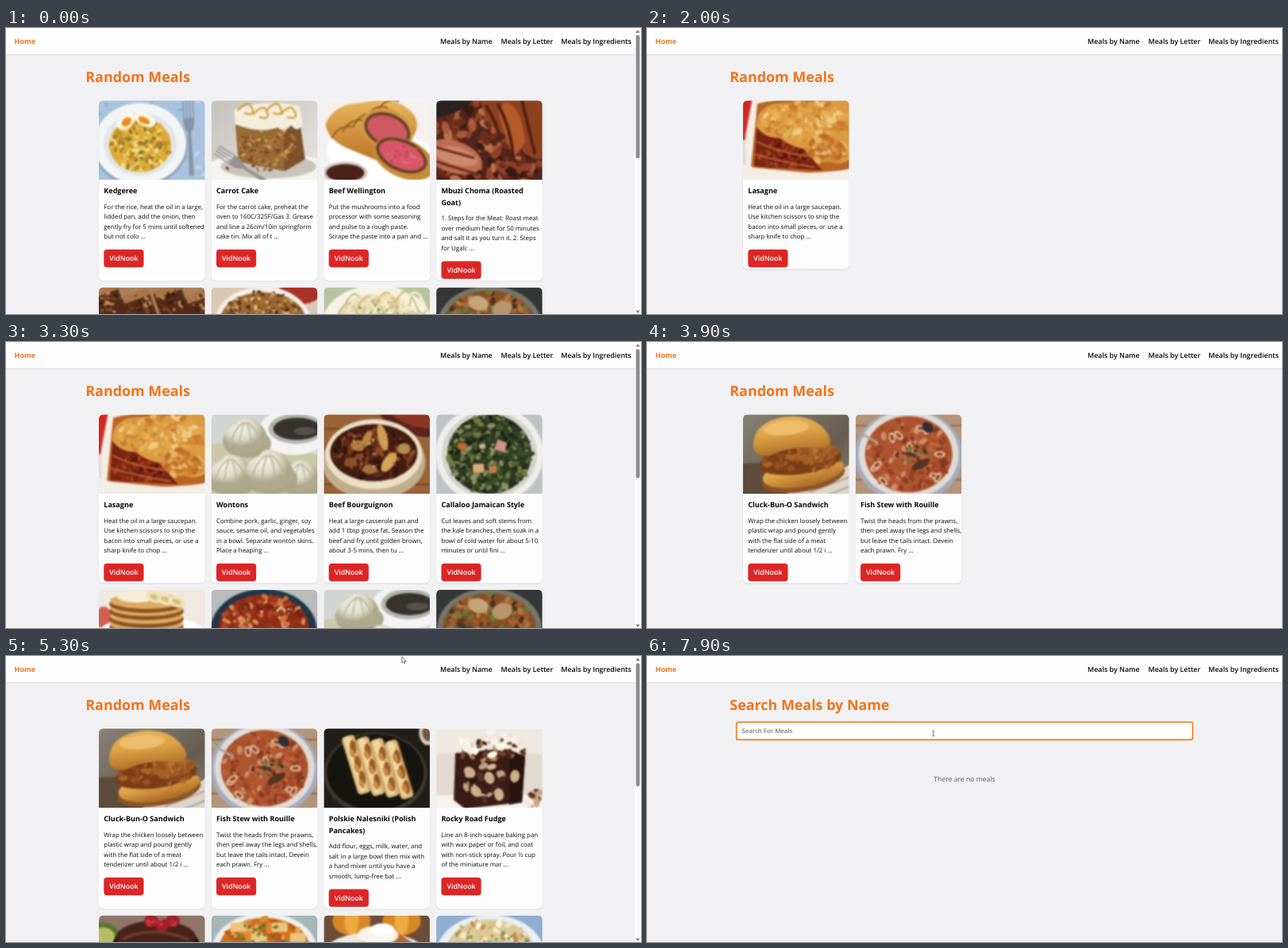
Write an HTML page that moves like this. It is 800 by 360 pixels and loops after 8 s.

```html
<!DOCTYPE html>
<html lang="en">
<head>
<meta charset="utf-8">
<title>Random Meals</title>
<style>
  html, body { margin: 0; width: 100%; height: 100%; overflow: hidden; background: #f1f1f4; }
  svg { display: block; width: 100vw; height: 100vh; }
  text { font-family: "Open Sans", "Noto Sans", sans-serif; text-rendering: geometricPrecision; white-space: pre; }
  .h1 { font-size: 17.9px; font-weight: 700; fill: #f27318; }
  .home { font-size: 9px; font-weight: 700; fill: #f27318; }
  .link { font-size: 8.9px; font-weight: 600; fill: #060606; }
  .title { font-size: 9.05px; font-weight: 700; fill: #060606; }
  .body { font-size: 7.9px; fill: #0c0c0c; }
  .button { font-size: 8.8px; font-weight: 600; fill: #fff; }
  .hint { font-size: 7.8px; font-weight: 600; fill: #77777b; }
  .empty { font-size: 8.67px; fill: #5c5f66; }
  .status { font-size: 6px; fill: #56687e; }
  .soft { filter: blur(.8px); }
</style>
</head>
<body>
<svg viewBox="0 0 800 360" xmlns="http://www.w3.org/2000/svg">
  <defs>
    <clipPath id="photo"><path d="M0 99.8V6Q0 0 6 0H127.5Q133.5 0 133.5 6V99.8Z"/></clipPath>
    <linearGradient id="crust" x2="0" y2="1"><stop stop-color="#e9b65c"/><stop offset="1" stop-color="#b97426"/></linearGradient>
    <linearGradient id="bun" x2=".25" y2="1"><stop stop-color="#e8b35a"/><stop offset=".5" stop-color="#dda247"/><stop offset="1" stop-color="#b0702a"/></linearGradient>
    <linearGradient id="linen" x2="1" y2="1"><stop stop-color="#c4c1bb"/><stop offset="1" stop-color="#e9e6e1"/></linearGradient>
    <linearGradient id="table" x2="1" y2="1"><stop stop-color="#8b8376"/><stop offset=".6" stop-color="#665d50"/><stop offset="1" stop-color="#8d8274"/></linearGradient>
    <radialGradient id="dough" cx=".4" cy=".3"><stop stop-color="#f4f1e6"/><stop offset=".6" stop-color="#dfdbc8"/><stop offset="1" stop-color="#aea88d"/></radialGradient>
  </defs>
  <g id="page"></g><g id="nav"></g><g id="overlay"></g>
</svg>
<script>
const LOOP = 8000, RELOADS = [1700, 3500], OPEN_SEARCH = 6800, FOCUS = 7700, CARD_TOP = 91.3;
const layer = id => document.getElementById(id);

const text = (x, y, cls, s, extra = "") => `<text x="${x}" y="${y}" class="${cls}" ${extra}>${s}</text>`;
const rect = (x, y, w, h, fill, r = 0, extra = "") =>
  `<rect x="${x}" y="${y}" width="${w}" height="${h}" rx="${r}" fill="${fill}" ${extra}/>`;
const oval = (x, y, rx, ry, fill, turn = 0) =>
  `<ellipse cx="${x}" cy="${y}" rx="${rx}" ry="${ry}" fill="${fill}" transform="rotate(${turn} ${x} ${y})"/>`;
const shape = (d, fill) => `<path d="${d}" fill="${fill}"/>`;
const line = (d, color, w) => `<path d="${d}" fill="none" stroke="${color}" stroke-width="${w}" stroke-linecap="round"/>`;
const ground = fill => rect(-4, -4, 142, 110, fill);

// Seeded bits of food inside an ellipse.
function bits(seed, n, x, y, rx, ry, size, colors) {
  const rnd = () => (seed = (seed * 16807 + 11) % 2147483647) / 2147483647;
  for (let i = 0; i < 9; i++) rnd();
  let out = "";
  for (let i = 0; i < n; i++) {
    const a = rnd() * 6.283, d = Math.sqrt(rnd()), s = size * (.5 + rnd() * .7);
    out += oval((x + Math.cos(a) * d * rx).toFixed(1), (y + Math.sin(a) * d * ry).toFixed(1),
      s.toFixed(1), (s * .6).toFixed(1), colors[Math.floor(rnd() * colors.length)], Math.round(rnd() * 180));
  }
  return out;
}
const fork = (x, y, turn, color) => `<g transform="translate(${x} ${y}) rotate(${turn})">` +
  [-6, -2, 2, 6].map(p => line(`M${p} 0V24`, color, 1.6)).join("") +
  shape("M-7 22H7Q7 36 2 40L3 95H-3L-2 40Q-7 36-7 22Z", color) + "</g>";
const dumpling = (x, y, s) => `<g transform="translate(${x} ${y}) scale(${s})">` + oval(2, 8, 25, 15, "#aaa68a") +
  shape("M-24 6Q-22-8-9-13Q-4-22 5-18Q20-15 24 5Q22 17 0 18Q-21 17-24 6Z", "url(#dough)") +
  [-15, -6, 6, 15].map(p => line(`M${p} 9Q${p * .9}-6 ${p * .15}-14`, "#b9b39a", 1.3)).join("") + "</g>";

const dishes = {
  kedgeree: () => ground("#a9c3df") + bits(4, 45, 66, 50, 95, 70, 4, ["#bfd4e9", "#92b0d2"]) +
    oval(52, 56, 60, 53, "#8da7c5") + oval(52, 54, 58, 51, "#f3f5f5") + oval(52, 55, 46, 40, "#e2e6e7") +
    oval(52, 56, 39, 34, "#d9aa38") + bits(7, 150, 52, 56, 37, 32, 4, ["#edc757", "#f3dc88", "#c28c25", "#e2b23e", "#a98128"]) +
    oval(34, 26, 13, 9, "#faf7ea", -38) + oval(35, 27, 7, 5, "#ed8c21", -38) +
    oval(58, 24, 14, 8, "#faf7ea", 25) + oval(57, 25, 8, 4, "#ed8c21", 25) +
    bits(12, 14, 48, 58, 30, 25, 3, ["#6f7d30", "#a0662c"]) + fork(112, 0, -3, "#8594a4"),
  carrotCake: () => ground("url(#linen)") + oval(72, 89, 85, 23, "#f4f3ee") + oval(72, 83, 60, 15, "#c9c3b9") +
    shape("M30 27L111 24L118 74L92 89L34 77Z", "#976a36") +
    shape("M91 33L111 25L118 74L92 89Z", "#7c522b") +
    bits(5, 130, 71, 57, 36, 25, 3, ["#b48245", "#6c4722", "#c69a5d", "#845625", "#bc7131"]) +
    shape("M29 12Q65-3 111 7L115 30Q108 42 101 31Q91 42 84 34Q60 42 30 30Z", "#f4eddc") +
    [34, 53, 70, 88].map((x, i) => line(`M${x} ${12 + i % 2 * 5}q12-14 17-3t-9 7`, "#d39b36", 2.2)).join("") +
    bits(8, 10, 58, 84, 43, 5, 3, ["#87562c", "#ae7840"]) + fork(7, 62, -57, "#929392"),
  wellington: () => ground("#f4f0ec") + oval(77, 74, 75, 39, "#fff", 13) +
    shape("M2 30Q12 4 47 3Q88-8 110 14Q127 32 106 53L73 78L27 59Q5 48 2 30Z", "url(#crust)") +
    [0, 1, 2, 3, 4].map(i => line(`M${10 + i * 14} ${47 - i * 8}Q${19 + i * 15} ${30 - i * 9} ${38 + i * 14} ${33 - i * 8}`, "#8d541d", 1.7)).join("") +
    oval(80, 36, 34, 25, "#d29643", 22) + oval(80, 37, 30, 21, "#69452d", 22) + oval(80, 37, 26, 17, "#cf5962", 22) +
    oval(101, 73, 41, 24, "#ca8b35", 24) + oval(98, 69, 34, 20, "#65432d", 24) + oval(98, 69, 30, 16, "#d75668", 24) +
    bits(9, 35, 98, 69, 25, 12, 2, ["#df7580", "#c64558"]) + oval(27, 91, 28, 14, "#d0cac0") + oval(27, 91, 24, 11, "#4b2118"),
  roast: () => ground("#51251a") + bits(3, 180, 67, 52, 78, 62, 8, ["#8f4129", "#6b2d1c", "#a9583a", "#3b1a13", "#8f4129", "#b9704c"]) +
    shape("M54-4H138V72Q111 80 97 42Q82 48 64 25Z", "#8d421f") + shape("M87 2Q107 5 112 52L98 72Q84 42 78 12Z", "#b45a2b") +
    line("M78 5Q94 35 97 70M108 0Q116 33 124 66M63 7Q76 28 81 49", "#512113", 4) +
    oval(22, 71, 37, 20, "#bc6c52", 18) + oval(25, 70, 28, 11, "#cb8a6c", 14) + line("M0 59L47 72M0 77L52 93", "#6c2b1f", 3) +
    shape("M-4-4H48Q35 17-4 22Z", "#292221"),
  lasagne: () => ground("#e4ded2") + shape("M-4-4H19L2 50H-4Z", "#d42822") + shape("M12-4H138V82L115 100H5L3 44Z", "#f4eee4") +
    shape("M18 4Q57-7 138 2V84L112 94L10 84Z", "#b96425") + shape("M17 34L66 50L100 88L14 83Z", "#7b2414") +
    bits(8, 90, 50, 68, 34, 16, 4, ["#8f2d18", "#58190e", "#a8451f", "#7b2414"]) +
    shape("M17 33Q16 10 40 4L138-2V72Q124 83 108 77Q92 80 80 61Q62 60 46 47Q28 48 17 33Z", "#db9b42") +
    bits(15, 110, 78, 26, 54, 25, 6, ["#e6b25c", "#d08735", "#e3a648", "#efc982", "#c87a2c", "#dc9c43"]) +
    bits(6, 60, 106, 61, 27, 17, 5, ["#d78c3b", "#e6b568", "#be6c27", "#c87a2c"]) +
    line("M18 52Q44 65 80 70M16 68Q52 78 90 84", "#b8642f", 2) + shape("M-4 78Q45 99 138 86V108H-4Z", "#f3ede4"),
  wontons: () => ground("#d3d5d3") + shape("M-4 38Q60 30 138 52V108H-4Z", "#cbc7a8") + oval(104, 22, 45, 29, "#f3f3f1") +
    oval(107, 18, 35, 19, "#b5b4ae") + oval(108, 18, 30, 14, "#37322d") + oval(118, 21, 14, 5, "#57504a") +
    dumpling(43, 27, 1.2) + dumpling(112, 78, 1.1) + dumpling(24, 74, 1.25) + dumpling(72, 70, 1.35),
  bourguignon: () => ground("#9a6237") + line("M0 18H134M0 88H134", "#774a22", 2) + oval(111, 5, 43, 20, "#5b241b", 18) +
    oval(114, 1, 35, 13, "#8d3625", 18) + oval(63, 60, 65, 47, "#bfae8c") + oval(63, 50, 61, 44, "#eadfc6") +
    oval(63, 48, 55, 36, "#421d12") + bits(17, 130, 63, 49, 50, 31, 5, ["#5f2a18", "#30140e", "#7b3a20", "#4a1d12", "#8c4a28"]) +
    oval(74, 29, 6, 17, "#cf9c54", -14) + oval(54, 31, 5, 12, "#bd8441", 25) + oval(82, 60, 7, 14, "#d7a458", 35) +
    oval(43, 39, 9, 7, "#b47d42") + oval(101, 43, 8, 7, "#b88b50") + oval(34, 60, 8, 6, "#8f4f2b") + oval(58, 69, 9, 6, "#a6713d") +
    bits(4, 16, 62, 49, 42, 25, 2, ["#597331", "#dcb678"]),
  callaloo: () => ground("#bfc1c2") + oval(67, 50, 68, 62, "#eeeeeb") + oval(67, 50, 60, 55, "#d3d4cd") +
    oval(67, 50, 53, 50, "#2d3722") +
    bits(21, 330, 67, 50, 52, 48, 4.5, ["#4f5e30", "#252f1c", "#6d7a40", "#3b4d27", "#1a2215", "#8c9261", "#35432a"]) +
    rect(75, 33, 13, 13, "#d59385", 2, 'transform="rotate(20 81 39)"') + rect(46, 62, 14, 11, "#d8ac78", 2) +
    rect(27, 36, 11, 8, "#c5672f", 2) + rect(66, 65, 10, 9, "#c77a49", 2) + rect(54, 37, 8, 6, "#cbb48a", 2),
  sandwich: () => ground("url(#table)") + shape("M-4 62Q40 58 138 70V108H-4Z", "#5d4c3b") +
    shape("M62 96Q100 88 138 60V108H44Z", "#dcd5ca") + line("M84 98L136 78M108 101L138 89", "#9b7a6c", 1.2) +
    oval(76, 79, 53, 18, "#8a5526", -10) + oval(76, 73, 52, 18, "url(#bun)", -10) +
    oval(72, 58, 52, 17, "#7b3d17", -8) + bits(5, 80, 73, 57, 49, 13, 5, ["#96511f", "#7b3d17", "#aa6529", "#8a471c"]) +
    oval(94, 49, 27, 11, "#a66128", -8) + bits(11, 25, 96, 48, 24, 8, 4, ["#b97535", "#96511f"]) +
    shape("M13 41Q12 9 53 3Q96-1 110 31Q112 45 92 42Q54 40 34 52Q15 54 13 41Z", "url(#bun)") +
    oval(54, 17, 29, 9, "#edbd6c", -5),
  fishStew: () => ground("#b2957a") + line("M0 14H134M0 82H134", "#8d6c50", 2) + oval(67, 52, 68, 59, "#a4acbd") +
    oval(67, 50, 63, 55, "#e0dbd6") + oval(67, 50, 55, 48, "#ad5431") +
    bits(19, 150, 67, 50, 52, 45, 5, ["#bd6640", "#984123", "#cf8e65", "#b55a34", "#833a22", "#a94c29"]) +
    Array.from({ length: 11 }, (_, i) => oval(65 + 41 * Math.cos(i * 2.4), 50 + 34 * Math.sin(i * 1.7), 7, 4, "#e3ba94", i * 37) +
      oval(65 + 41 * Math.cos(i * 2.4), 50 + 34 * Math.sin(i * 1.7), 4, 2, "#8c432a", i * 37)).join("") +
    oval(91, 16, 8, 6, "#302e35", 40) + oval(82, 63, 13, 5, "#553323", -30) + line("M-3 18L27 35", "#aaa39e", 3) +
    bits(2, 26, 72, 50, 21, 15, 3, ["#687638", "#3f3b22", "#5b2f1f"]),
  nalesniki: () => ground("#221d17") + oval(65, 57, 65, 52, "#3e382b") + oval(65, 55, 61, 48, "#15140e") +
    [0, 1, 2, 3].map(i => `<g transform="translate(${31 + i * 18} ${15 + i * 2}) rotate(-17)">` +
      rect(-8, -6, 17, 76, "#d9b778", 5) + rect(-5, -5, 9, 72, "#f0d7a2", 4) +
      [10, 30, 50].map(y => oval(3, y + i * 2, 4, 9, "#9c5a22", 8) + oval(0, y + 7, 3, 6, "#c68a45", -6)).join("") +
      line("M9 0V66", "#7a4a20", 1.5) + "</g>").join("") +
    oval(131, 5, 11, 16, "#cfc9bd") + oval(132, 5, 8, 11, "#73563b"),
  rockyRoad: () => ground("#e2dad1") + rect(-4, -4, 142, 36, "#efe8e0") + rect(-4, 84, 142, 24, "#f6f2ec") +
    shape("M24 31L88 25L112 35L108 93L36 101L22 90Z", "#391d16") + shape("M92 28L112 35L108 93L92 96Z", "#27130f") +
    bits(27, 30, 58, 70, 30, 25, 6, ["#bfa181", "#5b3021", "#d3ba96", "#4a2418", "#2e1610"]) +
    [[42, 55], [67, 62], [50, 79], [79, 83], [99, 60]].map(([x, y]) => oval(x, y, 8, 6, "#ccb08c", x)).join("") +
    bits(12, 45, 68, 27, 43, 13, 4, ["#5a2f20", "#7a4a2e", "#b98a58", "#432015"]) +
    bits(10, 26, 68, 21, 40, 17, 6, ["#f7f1e8", "#efe3d3", "#fffaf1"]) +
    bits(14, 14, 123, 88, 13, 12, 6, ["#583024", "#c9a77e", "#f0e4d5"]),
  dateBars: () => ground("#a9825c") + [0, 1, 2, 3].map(i => `<g transform="translate(${-12 + i * 40} ${8 + i % 2 * 7}) rotate(-20)">` +
    rect(0, 0, 36, 43, "#542a18", 2) + rect(2, -3, 34, 10, "#aa7647", 2) +
    bits(i + 2, 25, 18, 18, 16, 16, 3, ["#784626", "#c08c5c", "#381b12"]) + "</g>").join(""),
  rice: () => ground("#d9c9b4") + oval(113, 3, 27, 18, "#a83223") + oval(65, 46, 61, 47, "#f3f0e9") + oval(65, 42, 54, 36, "#9c6832") +
    bits(15, 160, 65, 34, 48, 29, 3, ["#c8964d", "#734520", "#e0bd78", "#543219", "#aa7437"]),
  pasta: () => ground("#b7c39f") + oval(67, 48, 70, 51, "#f5f2e7") + oval(67, 46, 54, 38, "#e7dbae") +
    Array.from({ length: 22 }, (_, i) => line(`M${18 + i * 4} ${35 + 15 * Math.sin(i * 2)}q13-30 25 0t19-8`, i % 2 ? "#f4edcf" : "#cfbe83", 2.3)).join("") +
    bits(5, 16, 67, 27, 41, 19, 2, ["#6d8a3c"]),
  soup: () => ground("#343735") + oval(67, 49, 66, 51, "#77766c") + oval(67, 49, 59, 45, "#855027") +
    bits(11, 120, 67, 42, 54, 38, 5, ["#5f3d23", "#a66c35", "#b07a40", "#48321f", "#a8592c", "#697a39"]) +
    oval(53, 20, 13, 9, "#c6a47a", 12) + oval(83, 27, 13, 10, "#b8966c", -20),
  pancakes: () => ground("#efe9df") + oval(6, 35, 10, 14, "#d2604e") + oval(67, 56, 68, 24, "#fff") +
    [43, 33, 23, 14].map(y => oval(60, y + 4, 47, 11, "#8f501f") + oval(60, y, 46, 10, "#dbab62")).join("") +
    oval(48, 9, 25, 7, "#f7eed5") + [70, 84, 98].map((x, i) => oval(x, 9 + i * 3, 11, 7, "#efe2b4", 20) + oval(x, 9 + i * 3, 6, 3, "#d5bd76", 20)).join(""),
  beans: () => ground("#b9bcbb") + oval(66, 51, 67, 52, "#22364a") + oval(66, 48, 57, 42, "#8f2c17") +
    bits(18, 140, 66, 42, 52, 36, 5, ["#b34a24", "#79210f", "#cf7440", "#9a361b", "#d6905a"]) + bits(3, 16, 66, 26, 40, 16, 2, ["#5b6b30", "#f0d8b8"]),
  chocolate: () => ground("#8e7568") + oval(4, 27, 22, 18, "#55752d") + oval(5, 27, 15, 12, "#b5bd64") +
    oval(72, 42, 56, 36, "#24110d") + oval(72, 27, 50, 20, "#482318") + line("M32 29Q66 12 112 30", "#693a2b", 4) +
    [66, 80, 93].map((x, i) => oval(x, 7 + i % 2 * 5, 9, 8, "#a31f2a") + bits(i + 3, 8, x, 8, 6, 5, 2, ["#cf4049"])).join(""),
  paneer: () => ground("#a7b6b8") + oval(67, 44, 66, 47, "#edf0eb") + oval(67, 41, 57, 38, "#cf701c") +
    bits(22, 80, 67, 34, 51, 30, 6, ["#dd8a30", "#b95a18", "#e8a650"]) +
    [24, 50, 76, 99].map((x, i) => rect(x, 9 + i % 2 * 13, 20, 12, "#ecc47c", 3)).join("") + bits(4, 18, 66, 24, 40, 17, 3, ["#557431"]),
  pumpkinPie: () => ground("#6d4d37") + [35, 98].map(x => oval(x, 7, 24, 18, "#d88726") + oval(x, 7, 9, 18, "#eda942") + line(`M${x}-9V-3`, "#596039", 4)).join("") +
    oval(64, 47, 63, 26, "#efe8df") + shape("M12 43L93 22L118 38L102 54Z", "#bc6728") + oval(68, 25, 26, 12, "#fbf3e7") + oval(74, 18, 15, 8, "#fff"),
  noodles: () => ground("#8faed0") + oval(68, 49, 68, 50, "#e9eff5") + oval(68, 44, 55, 39, "#d9ca9a") +
    bits(25, 160, 68, 39, 52, 34, 4, ["#efe7c9", "#c5a962", "#faf3df", "#84994d", "#ce8848", "#d8c58d"])
};
const photo = name => `<g clip-path="url(#photo)"><g class="soft">${dishes[name]()}</g></g>`;
const meal = (dish, title, copy) => ({ dish, title: title.split("|"), copy: copy.split("|") });

const menus = [
  { pitch: 233, below: ["dateBars", "rice", "pasta", "soup"], top: [
    meal("kedgeree", "Kedgeree", "For the rice, heat the oil in a large,|lidded pan, add the onion, then|gently fry for 5 mins until softened|but not colo ..."),
    meal("carrotCake", "Carrot Cake", "For the carrot cake, preheat the|oven to 160C/325F/Gas 3. Grease|and line a 26cm/10in springform|cake tin. Mix all of t ..."),
    meal("wellington", "Beef Wellington", "Put the mushrooms into a food|processor with some seasoning|and pulse to a rough paste.|Scrape the paste into a pan and ..."),
    meal("roast", "Mbuzi Choma (Roasted|Goat)", "1. Steps for the Meat: Roast meat|over medium heat for 50 minutes|and salt it as you turn it. 2. Steps|for Ugali: ...")] },
  { pitch: 221, below: ["pancakes", "beans", "wontons", "soup"], top: [
    meal("lasagne", "Lasagne", "Heat the oil in a large saucepan.|Use kitchen scissors to snip the|bacon into small pieces, or use a|sharp knife to chop ..."),
    meal("wontons", "Wontons", "Combine pork, garlic, ginger, soy|sauce, sesame oil, and vegetables|in a bowl. Separate wonton skins.|Place a heaping ..."),
    meal("bourguignon", "Beef Bourguignon", "Heat a large casserole pan and|add 1 tbsp goose fat. Season the|beef and fry until golden brown,|about 3-5 mins, then tu ..."),
    meal("callaloo", "Callaloo Jamaican Style", "Cut leaves and soft stems from|the kale branches, them soak in a|bowl of cold water for about 5-10|minutes or until fini ...")] },
  { pitch: 233, below: ["chocolate", "paneer", "pumpkinPie", "noodles"], top: [
    meal("sandwich", "Cluck-Bun-O Sandwich", "Wrap the chicken loosely between|plastic wrap and pound gently|with the flat side of a meat|tenderizer until about 1/2 i ..."),
    meal("fishStew", "Fish Stew with Rouille", "Twist the heads from the prawns,|then peel away the legs and shells,|but leave the tails intact. Devein|each prawn. Fry ..."),
    meal("nalesniki", "Polskie Nalesniki (Polish|Pancakes)", "Add flour, eggs, milk, water, and|salt in a large bowl then mix with|a hand mixer until you have a|smooth, lump-free bat ..."),
    meal("rockyRoad", "Rocky Road Fudge", "Line an 8-inch-square baking pan|with wax paper or foil, and coat|with non-stick spray. Pour ½ cup|of the miniature mar ...")] }
];

const card = (col, y, h, inner) => `<g transform="translate(${117 + col * 141.7} ${y})">` +
  rect(-.3, .7, 134.1, h + .4, "#dedee2", 6) + rect(0, 0, 133.5, h, "#fdfdfd", 6) + inner + "</g>";

function mealCard(m, col, h) {
  const drop = (m.title.length - 1) * 14.6;
  return card(col, CARD_TOP, h, photo(m.dish) +
    m.title.map((s, i) => text(6.3, 116.9 + i * 14.6, "title", s)).join("") +
    m.copy.map((s, i) => text(6.3, 136.6 + drop + i * 12.5, "body", s)).join("") +
    rect(6.3, 187.5 + drop, 50.2, 22.4, "#dc2626", 4) + text(31.4, 202 + drop, "button", "VidNook", 'text-anchor="middle"'));
}

function homePage(menu, count) {
  const shown = menu.top.slice(0, count);
  const h = shown.some(m => m.title.length > 1) ? 226.9 : 212.3;
  return `<g transform="translate(${count > 4 ? 0 : 4} 0)">` + text(100.3, 67.7, "h1", "Random Meals") +
    shown.map((m, i) => mealCard(m, i, h)).join("") +
    menu.below.slice(0, Math.max(0, count - 4)).map((d, i) => card(i, CARD_TOP + h + 8.3, 212, photo(d))).join("") + "</g>";
}

const searchPage = focused => text(104.3, 67.7, "h1", "Search Meals by Name") +
  rect(112.7, 83.2, 574.8, 22.2, "#fff", 2.5, focused ? 'stroke="#ee7a1c" stroke-width="1.6"' : 'stroke="#e2e3e7" stroke-width=".6"') +
  text(119.5, 97.4, "hint", "Search For Meals") + text(400, 158, "empty", "There are no meals", 'text-anchor="middle"');

const links = [
  { x: 547, w: 66, name: "Meals by Name", path: "by-name" },
  { x: 623.5, w: 65, name: "Meals by Letter", path: "by-letter" },
  { x: 699.3, w: 89, name: "Meals by Ingredients", path: "by-ingredients" }
];
const navBar = (shift, hovered) => rect(0, 33, 800, 1.2, "#e0e0e4") + rect(0, 0, 800, 33, "#fefefe") + text(10.5, 20, "home", "Home") +
  links.map(l => (l === hovered ? rect(l.x + shift - 4.5, 0, l.w + 9, 33, "#f5731a") : "") +
    text(l.x + shift, 20, "link", l.name, l === hovered ? 'style="fill:#fff"' : "")).join("");

const scrollBar = length => rect(792, 0, 8, 360, "#fafafa") + rect(793.6, 9, 4.8, length, "#8b8b8b", 2.4) +
  shape("M793.3 6L796 2.2L798.7 6Z", "#858585") + shape("M793.3 355.5L796 359.3L798.7 355.5Z", "#858585");

const pointers = {
  arrow: '<path d="M0 0V7.6L1.8 6L3 8.6L4.2 8L3 5.5H5.4Z" fill="#fff" stroke="#222" stroke-width=".6"/>',
  hand: '<path d="M-.8 .6Q0-.4 .8 .6V3.4L3.7 4.2Q4.5 4.5 4.3 6L3.5 9.6H-.9L-3 6.2Q-3 5-1.8 5.6L-.8 6.4Z" fill="#fff" stroke="#222" stroke-width=".6"/>',
  beam: '<path d="M-1.5-3.2Q0-3.2 0-2.4V2.4Q0 3.2-1.5 3.2M1.5-3.2Q0-3.2 0-2.4M0 2.4Q0 3.2 1.5 3.2" fill="none" stroke="#444" stroke-width=".7"/>'
};
const route = [[5200, 497, 0], [5300, 498.8, 1], [5600, 560, 13], [5900, 638, 25], [6300, 642, 28.5],
  [6600, 592, 18], [7100, 588, 20], [7500, 405, 78], [7700, 360.7, 97.5], [8000, 360.7, 97.5]];
function pointerAt(t) {
  const i = route.findIndex(p => p[0] > t);
  if (i < 1) return null;
  const [a, b] = [route[i - 1], route[i]], u = (t - a[0]) / (b[0] - a[0]), k = u * u * (3 - 2 * u);
  return { x: a[1] + (b[1] - a[1]) * k, y: a[2] + (b[2] - a[2]) * k };
}

const drawn = {};
function paint(id, key, make) {
  if (drawn[id] === key) return;
  drawn[id] = key;
  layer(id).innerHTML = make();
}

function update(time) {
  const t = Math.floor(time / 100) * 100, searching = t >= OPEN_SEARCH;
  const index = RELOADS.filter(r => t >= r).length, menu = menus[index];
  const count = index ? Math.max(0, Math.min(12, Math.floor((t - RELOADS[index - 1] - 280) / 115) + 1)) : 12;
  const scrolls = !searching && count > 4, shift = scrolls ? 0 : 8;
  const p = pointerAt(t);
  const hovered = p && p.y < 33 && links.find(l => p.x > l.x + shift - 4.5 && p.x < l.x + shift + l.w + 4.5);

  if (searching) paint("page", "search" + (t >= FOCUS), () => searchPage(t >= FOCUS));
  else paint("page", index + ":" + count, () => homePage(menu, count));
  paint("nav", shift + (hovered ? hovered.path : ""), () => navBar(shift, hovered));

  let top = "";
  if (scrolls) top += scrollBar(342 * 360 / (95 + Math.ceil(count / 4) * menu.pitch));
  if (hovered) top += rect(-1, 350, 73, 11, "#dde8f6", 1, 'stroke="#c3cfdf" stroke-width=".5"') +
    text(2, 357.6, "status", "localhost:5173/" + hovered.path);
  if (p) {
    const inField = searching && p.y > 83 && p.y < 106;
    top += `<g transform="translate(${p.x} ${p.y})">${pointers[hovered ? "hand" : inField ? "beam" : "arrow"]}</g>`;
  }
  paint("overlay", top, () => top);
}

function tick() {
  update(performance.now() % LOOP);
  requestAnimationFrame(tick);
}
tick();
</script>
</body>
</html>
```
